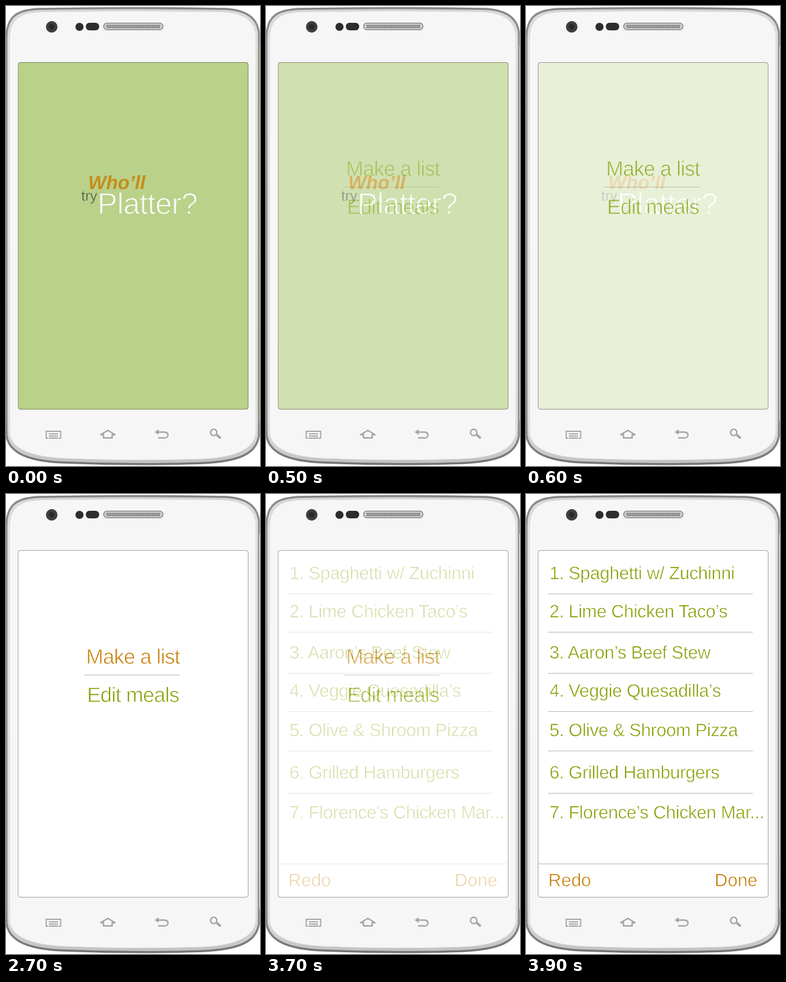
Animation, 439 px wide and 794 px high, one loop 8 s. Source, as an HTML page:

```html
<!DOCTYPE html>
<html lang="en">
<head>
<meta charset="utf-8">
<title>Meal planner</title>
<style>
  html, body { margin: 0; width: 100%; height: 100%; overflow: hidden; background: #fff; }
  svg { display: block; width: 439px; height: 794px; }
  /* an outline in the background colour gives the letters a light weight */
  text { font-family: "Liberation Sans", Arial, sans-serif; white-space: pre; text-rendering: geometricPrecision; stroke: #fff; }
  .title text { stroke: #bad18a; }
  .title .lead { font: italic bold 33px "Liberation Sans", Arial, sans-serif; stroke: none; }
  .menu text { font-size: 36px; letter-spacing: -.9px; stroke-width: .9; }
  .list text { font-size: 31px; stroke-width: .7; }
  .meals text { letter-spacing: -.45px; }
  .green { fill: #82a000; }
  .orange { fill: #c67c00; }
  .rule { stroke: #b4b4b4; stroke-width: 1; }
  .icon { fill: none; stroke: #a4a4a4; stroke-width: 2.4; stroke-linejoin: round; }
  .menu, .list, .pick { animation: 8s step-end infinite; }
  .menu { animation-name: menu; }
  .pick { animation-name: pick; }
  .list { animation-name: list; }
  @keyframes menu {
    0% { opacity: 0; }
    6.25% { opacity: .3333; }
    7.5% { opacity: .6667; }
    8.75%, 100% { opacity: 1; }
  }
  @keyframes pick {
    0% { fill: #82a000; }
    33.75%, 100% { fill: #c67c00; }
  }
  @keyframes list {
    0% { opacity: 0; }
    46.25% { opacity: .3333; }
    47.5% { opacity: .6667; }
    48.75%, 100% { opacity: 1; }
  }
</style>
</head>
<body>
<svg viewBox="0 0 439 794">
  <defs>
    <linearGradient id="rim" x2="0" y2="1">
      <stop offset="0" stop-color="#868686"/>
      <stop offset=".08" stop-color="#989898"/>
      <stop offset=".9" stop-color="#929292"/>
      <stop offset="1" stop-color="#747474"/>
    </linearGradient>
    <linearGradient id="bevel" x2="0" y2="1">
      <stop offset="0" stop-color="#d6d6d6"/>
      <stop offset=".08" stop-color="#e4e4e4"/>
      <stop offset=".92" stop-color="#e0e0e0"/>
      <stop offset="1" stop-color="#c0c0c0"/>
    </linearGradient>
    <pattern id="mesh" width="3" height="3" patternUnits="userSpaceOnUse">
      <rect width="3" height="3" fill="#b4b4b4"/>
      <rect width="1.8" height="1.8" fill="#666"/>
    </pattern>
    <clipPath id="view">
      <rect x="21" y="97" width="398" height="599.5" rx="4"/>
      <rect x="438" y="69" width="1" height="647"/>
    </clipPath>
  </defs>

  <!-- phone body -->
  <path d="M1 50C3 17 20 6 60 5Q219 2 376 5C411 6 434 18 437 46V742C433 772 405 786 340 789Q219 793 100 788C42 786 6 773 1 742Z" fill="url(#bevel)" stroke="url(#rim)" stroke-width="3.6"/>
  <path d="M6 54C8 22 24 11 62 10Q219 7 374 10C407 11 429 23 432 50V738C428 764 400 779 340 782Q219 786 100 781C44 778 11 766 6 738Z" fill="#f6f6f6" stroke="#d2d2d2" stroke-width="1"/>

  <circle cx="79" cy="36" r="10" fill="#3e3e40"/>
  <circle cx="79" cy="36" r="5" fill="#2a2a2e"/>
  <circle cx="127" cy="36" r="7" fill="#2d2d2f"/>
  <rect x="138" y="29" width="23" height="13" rx="6" fill="#2d2d2f"/>
  <rect x="169" y="29.5" width="102" height="11.5" rx="5" fill="#d0d0d0" stroke="#858585" stroke-width="1.6"/>
  <rect x="173" y="32" width="94" height="6.5" rx="2" fill="url(#mesh)"/>

  <g class="icon">
    <path d="M73 746H69.5V734H94.5V746H91M74 738.5H90M74 742.5H90M74 746H90" stroke-width="2"/>
    <path d="M176 732.5L163.5 740H168.5V745.5H183.5V740H188.5Z"/>
    <path d="M262 735.5H274Q280 736 280 740.5Q279.500 745.500 274 745.500H263"/>
    <path d="M264 730.5L257 735.5L264 740Z" fill="#a4a4a4" stroke="none"/>
    <circle cx="359" cy="736" r="5.5"/>
    <path d="M364 740L371 746" stroke-width="4"/>
  </g>

  <!-- screens -->
  <g clip-path="url(#view)">
    <g class="title">
      <rect width="439" height="794" fill="#bad18a"/>
      <text class="lead" x="142" y="315.5" fill="#c48e18">Who’ll</text>
      <text x="130" y="336" font-size="25" stroke-width=".5" fill="#505848">try</text>
      <text x="158" y="359" font-size="52" stroke-width="1.5" letter-spacing="-.8" fill="#fff">Platter?</text>
    </g>

    <g class="menu">
      <rect width="439" height="794" fill="#fff"/>
      <text class="pick" x="138.3" y="293">Make a list</text>
      <path class="rule" d="M135 312.5H300"/>
      <text class="green" x="140" y="359">Edit meals</text>
    </g>

    <g class="list">
      <rect width="439" height="794" fill="#fff"/>
      <path class="rule" d="M38 172.5H392M38 238.5H392M38 309.5H392M38 375.5H392M38 443.5H392M38 516.5H392M21 638.5H439"/>
      <g class="meals green">
        <text x="40.5" y="147">1. Spaghetti w/ Zuchinni</text>
        <text x="40.5" y="213">2. Lime Chicken Taco’s</text>
        <text x="40.5" y="284">3. Aaron’s Beef Stew</text>
        <text x="40.5" y="350">4. Veggie Quesadilla’s</text>
        <text x="40.5" y="418">5. Olive &amp; Shroom Pizza</text>
        <text x="40.5" y="491">6. Grilled Hamburgers</text>
        <text x="40.5" y="560">7. Florence’s Chicken Mar...</text>
      </g>
      <g class="orange">
        <text x="38.5" y="677">Redo</text>
        <text x="326" y="677">Done</text>
      </g>
    </g>
  </g>
  <rect x="21" y="97.5" width="397.5" height="598.5" rx="4" fill="none" stroke="#000" stroke-opacity=".36"/>
</svg>
</body>
</html>
```
